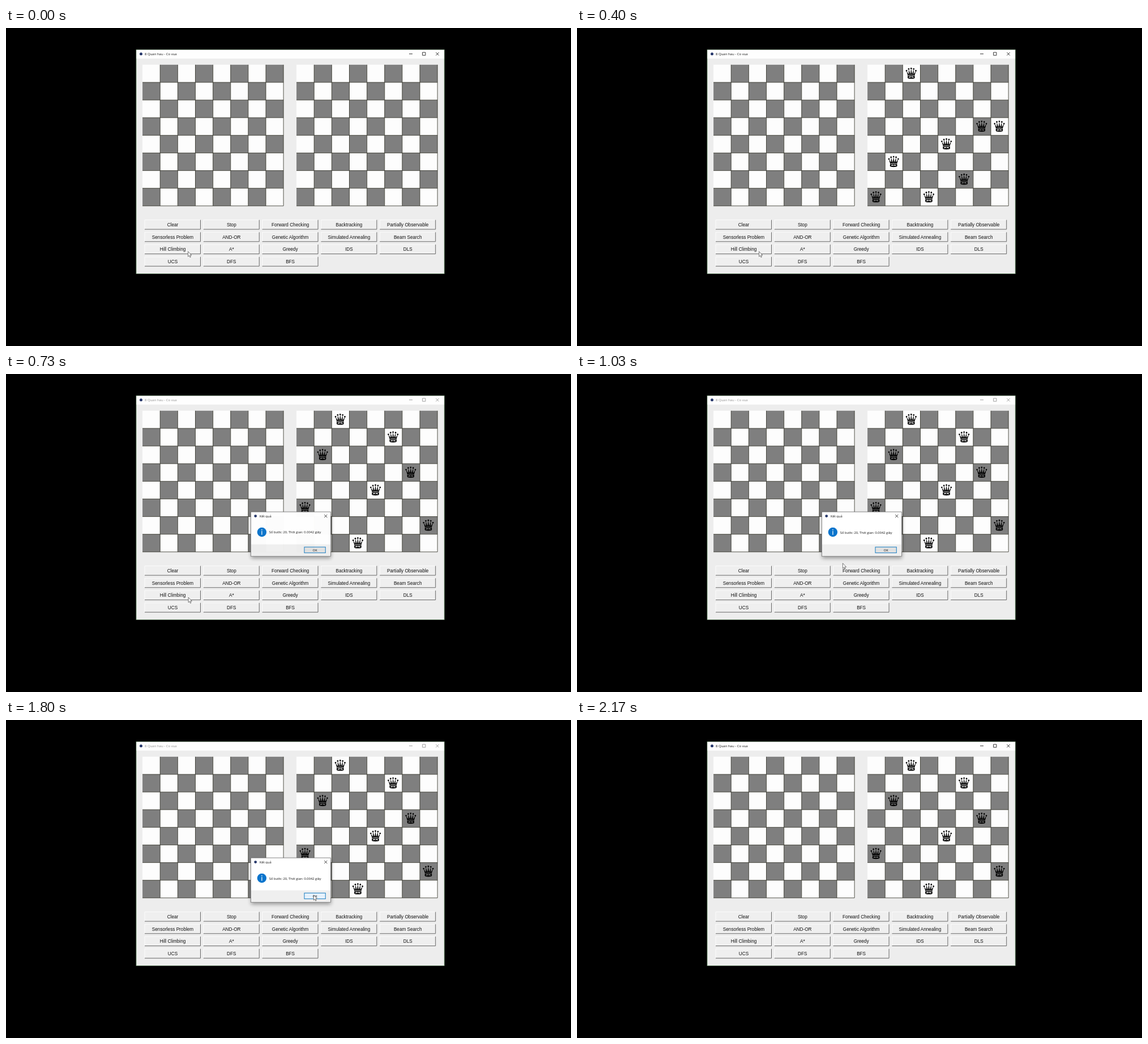
Write an HTML page that moves like this. It is 998 by 561 pixels and loops after 2510 ms.

```html
<!DOCTYPE html>
<html lang="vi">
<head>
<meta charset="utf-8">
<title>8 Quan hau</title>
<style>
  html, body { margin: 0; width: 100%; height: 100%; overflow: hidden; background: #000; }
  svg { display: block; width: 100vw; height: 100vh; }
  .ui { font-family: "Open Sans", "Noto Sans", sans-serif; }
  .btn { font: 8.2px "Liberation Sans", Arial, sans-serif; text-anchor: middle; fill: #111; }
</style>
</head>
<body>
<svg id="stage" viewBox="0 0 998 561" xmlns="http://www.w3.org/2000/svg">
  <defs>
    <filter id="soft" x="-20%" y="-20%" width="140%" height="150%"><feGaussianBlur stdDeviation="3.5"/></filter>
    <g id="queen">
      <g fill="#000">
        <circle cx="-8.2" cy="-4.6" r="1.35"/>
        <circle cx="-4.4" cy="-7.8" r="1.35"/>
        <circle cx="0" cy="-8.7" r="1.35"/>
        <circle cx="4.4" cy="-7.8" r="1.35"/>
        <circle cx="8.2" cy="-4.6" r="1.35"/>
        <path d="M-8.4-4.6 L-6.4 2.2 L-4.2 1.6Z M-4.6-7.8 L-4.2 1.8 L-1.6 1.4Z M0-8.7 L-1.4 1.5 H1.4Z M4.6-7.8 L4.2 1.8 L1.6 1.4Z M8.4-4.6 L6.4 2.2 L4.2 1.6Z"/>
        <path d="M-6.3 1.9 Q0-.1 6.3 1.9 L6 4.6 Q7 7 5.6 8.9 Q0 10.2-5.6 8.9 Q-7 7-6 4.6Z"/>
      </g>
      <path d="M-5.4 3.9 Q0 2 5.4 3.9" fill="none" stroke="currentColor" stroke-width=".9"/>
      <path d="M-4.7 7.4 Q-4.4 5.2 0 5 Q4.4 5.2 4.7 7.4 Q0 6.6-4.7 7.4Z" fill="currentColor"/>
      <path d="M-1.3 6 H1.3" stroke="#000" stroke-width="1"/>
    </g>
  </defs>

  <rect width="998" height="561"/>
  <rect x="230" y="38.3" width="544.2" height="395.2" fill="#ededed" stroke="#6f966f" stroke-width=".8"/>
  <rect x="230.5" y="38.7" width="543.3" height="15.3" fill="#fefefe"/>
  <circle cx="238.5" cy="45.7" r="2.5" fill="#26376b"/>
  <g id="caption" class="ui">
    <text x="245" y="48" font-size="6" fill="currentColor">8 Quan hau - Co vua</text>
    <path d="M712 45.7 h6 M735.7 43 h5.2 v5.2 h-5.2z M759.3 43 l5.4 5.4 m0 -5.4 l-5.4 5.4" fill="none" stroke="currentColor" stroke-width=".85"/>
  </g>
  <g id="boards"></g>
  <g id="buttons"></g>
  <g id="queens"></g>

  <g id="dialog" class="ui">
    <rect x="433" y="247" width="141" height="78" fill="#000" opacity=".38" filter="url(#soft)"/>
    <rect x="432.5" y="243.2" width="141" height="78.3" fill="#fff" stroke="#747474" stroke-width=".8"/>
    <rect x="433" y="300.5" width="140" height="20.6" fill="#efefef"/>
    <circle cx="440.7" cy="250.6" r="2.4" fill="#26376b"/>
    <text x="448" y="252.8" font-size="5.8" fill="#111">Kết quả</text>
    <path d="M562.2 248 l5.2 5.2 m0 -5.2 l-5.2 5.2" stroke="#111" stroke-width=".8"/>
    <circle cx="451.9" cy="279" r="8.2" fill="#0a74cc"/>
    <path d="M451.9 277 v6.8" stroke="#fff" stroke-width="1.2"/>
    <circle cx="451.9" cy="274.8" r=".85" fill="#fff"/>
    <text x="464.8" y="281.5" font-size="5.75" fill="#111">Số bước: 20, Thời gian: 0.0042 giây</text>
    <rect id="ok" x="527" y="305.3" width="37.3" height="10.2" stroke="#2b86c5" stroke-width="1.1"/>
    <text x="545.7" y="312.6" font-size="5.7" text-anchor="middle" fill="#111">OK</text>
  </g>

  <path id="cursor" d="M0 0 V9 L2 7.2 L3.4 10.3 L4.8 9.7 L3.4 6.6 H6.2Z" fill="#fff" stroke="#333" stroke-width=".65"/>
</svg>
<script>
const LOOP = 2510, CELL = 31.13, TOP = 64.8, BOARD_X = [241.1, 513.1];
const LIGHT = "#fdfdfd", DARK = "#7f7f7f";
const $ = id => document.getElementById(id);

function add(parent, tag, attrs, text) {
  const el = document.createElementNS("http://www.w3.org/2000/svg", tag);
  for (const key in attrs) el.setAttribute(key, attrs[key]);
  if (text) el.textContent = text;
  parent.appendChild(el);
  return el;
}
const shade = (row, col) => (row + col) % 2 ? DARK : LIGHT;

for (const x0 of BOARD_X) {
  for (let i = 0; i < 64; i++) {
    const row = i >> 3, col = i % 8;
    add($("boards"), "rect", {
      x: x0 + col * CELL, y: TOP + row * CELL, width: CELL, height: CELL, fill: shade(row, col)
    });
  }
  let grid = "";
  for (let i = 1; i <= 8; i++) {
    grid += `M${x0 + i * CELL} ${TOP}v${8 * CELL}M${x0} ${TOP + i * CELL}h${8 * CELL}`;
  }
  add($("boards"), "path", { d: grid, stroke: "#2b2b20", "stroke-width": .8 });
}

const labels = ["Clear", "Stop", "Forward Checking", "Backtracking", "Partially Observable",
  "Sensorless Problem", "AND-OR", "Genetic Algorithm", "Simulated Annealing", "Beam Search",
  "Hill Climbing", "A*", "Greedy", "IDS", "DLS", "UCS", "DFS", "BFS"];
labels.forEach((label, i) => {
  const x = 245 + i % 5 * 103.8, y = 338.6 + Math.floor(i / 5) * 21.7;
  const g = add($("buttons"), "g", { transform: `translate(${x} ${y})` });
  add(g, "rect", { width: 98.5, height: 16.5, fill: "#efefef" });
  add(g, "path", { d: "M0 16.5V0H98.5", fill: "none", stroke: "#fff", "stroke-width": .8 });
  add(g, "path", { d: "M0 16.5H98.5V0", fill: "none", stroke: "#686868", "stroke-width": 1 });
  add(g, "text", { class: "btn", x: 49.5, y: 11.4 }, label);
});

const queens = Array.from({ length: 8 }, () => add($("queens"), "use", { href: "#queen" }));

// Row of the queen in each column, then one [column, row] move per step.
const START = [4, 5, 6, 3, 7, 0, 2, 1];
const MOVES = [[4, 2], [0, 7], [6, 1], [2, 2], [5, 6], [7, 3], [3, 0],
  [4, 4], [2, 0], [3, 7], [6, 3], [0, 5], [7, 6], [1, 2], [5, 1]];
const FIRST_STEP = 30, STEP = 33.3;

function drawQueens(t) {
  const rows = START.slice();
  const count = Math.max(0, Math.floor((t - FIRST_STEP) / STEP));
  for (const [col, row] of MOVES.slice(0, count)) rows[col] = row;
  rows.forEach((row, col) => {
    const x = BOARD_X[1] + (col + .5) * CELL - .6, y = TOP + (row + .5) * CELL - .3;
    queens[col].setAttribute("transform", `translate(${x} ${y})`);
    queens[col].style.color = shade(row, col);
  });
  $("queens").style.display = t < FIRST_STEP ? "none" : "";
}

const clamp = v => Math.min(1, Math.max(0, v));
const smooth = v => v * v * (3 - 2 * v);

// [time, x, y] of the pointer tip
const PATH = [[720, 321.6, 394.3], [1030, 469.4, 333.8], [1270, 549, 297.6],
  [1400, 549, 297.6], [1620, 543.4, 308.8]];

function pointer(t) {
  let [, x, y] = PATH[0];
  for (let i = 1; i < PATH.length; i++) {
    const [t0, x0, y0] = PATH[i - 1], [t1, x1, y1] = PATH[i];
    if (t < t0) break;
    const k = smooth(clamp((t - t0) / (t1 - t0)));
    x = x0 + (x1 - x0) * k;
    y = y0 + (y1 - y0) * k;
  }
  return [x, y];
}

function draw(t) {
  drawQueens(t);
  $("caption").style.color = t >= 570 && t < 2000 ? "#8f8f8f" : "#111";

  const opening = clamp((t - 545) / 190), closing = clamp((t - 2000) / 130);
  const shown = t < 570 ? 0 : opening * (1 - closing);
  const scale = 1 - .06 * (1 - opening) ** 2 - .08 * closing;
  $("dialog").setAttribute("opacity", shown);
  $("dialog").setAttribute("transform",
    `translate(503 282.3) scale(${scale}) translate(-503 -282.3)`);

  const [x, y] = pointer(t);
  $("ok").setAttribute("fill", y > 304 && x > 527 && x < 565 ? "#e5f1fb" : "#e1e1e1");
  $("cursor").setAttribute("transform", `translate(${x} ${y})`);
  $("cursor").style.display = t < 2130 ? "" : "none";
}

const begin = performance.now();
function tick() {
  draw((performance.now() - begin) % LOOP);
  requestAnimationFrame(tick);
}
tick();
</script>
</body>
</html>
```
